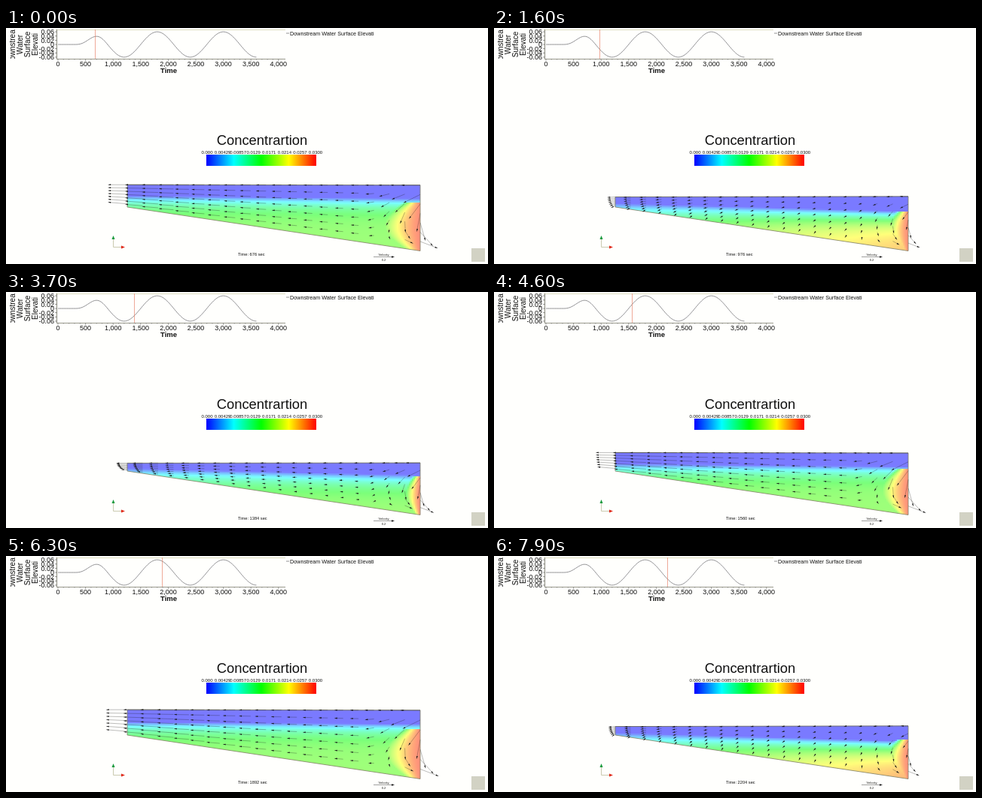
Recreate the animation shown at these times as an HTML page with a canvas. Size 640x315 px, loop 8 s.

```html
<!DOCTYPE html>
<html lang="en">
<head>
<meta charset="utf-8">
<title>Concentration in an estuary</title>
<style>
html, body { margin: 0; width: 100%; height: 100%; overflow: hidden; background: #fffffd; }
canvas { display: block; }
</style>
</head>
<body>
<canvas id="stage" width="640" height="315"></canvas>
<script>
const g = document.getElementById('stage').getContext('2d');
const LEFT = 161, RIGHT = 550, DEG = Math.PI / 180;
const STEP_MS = 100, STEPS = 80;
// [step, simulated seconds]
const CLOCK = [[0, 676], [9, 836], [24, 1132], [37, 1384], [55, 1736], [70, 2028], [79, 2204]];

const lerp = (a, b, k) => a + (b - a) * k;
const clamp = (v, a = 0, b = 1) => Math.min(b, Math.max(a, v));
const bed = x => lerp(239, 297.5, (x - LEFT) / (RIGHT - LEFT));
const phase = t => (t - 300) / 1200 * 2 * Math.PI;
const chartX = t => 69 + t * 0.0732;
const chartY = v => 22 - v * 282;

function ramp(t) {
  const w = clamp((t - 300) / 600);
  return w * w * (3 - 2 * w);
}
const level = t => 0.06 * ramp(t) * Math.sin(phase(t));

function simTime(step) {
  const i = CLOCK.findIndex(k => k[0] >= step);
  if (i < 1) return CLOCK[0][1];
  const [a, ta] = CLOCK[i - 1], [b, tb] = CLOCK[i];
  return Math.round(lerp(ta, tb, (step - a) / (b - a)) / 4) * 4;
}

function text(s, x, y, size, align = 'left', weight = '') {
  g.font = `${weight} ${size}px "Liberation Sans", Arial, sans-serif`;
  g.textAlign = align;
  g.fillStyle = '#111';
  g.fillText(s, x, y);
}

function line(points, color, width = 1) {
  g.beginPath();
  points.forEach(p => g.lineTo(...p));
  g.strokeStyle = color;
  g.lineWidth = width;
  g.stroke();
}

function head(x, y, angle, length, half, color) {
  const c = Math.cos(angle), s = Math.sin(angle);
  g.beginPath();
  g.moveTo(x, y);
  g.lineTo(x - length * c - half * s, y - length * s + half * c);
  g.lineTo(x - length * c + half * s, y - length * s - half * c);
  g.fillStyle = color;
  g.fill();
}

function arrow(x, y, dx, dy) {
  line([[x, y], [x + dx, y + dy]], 'rgba(30,30,30,.6)', 0.5);
  head(x + dx, y + dy, Math.atan2(dy, dx), 3.6, 0.9, '#151515');
}

function drawChart(t) {
  line([[66, 2.5], [371, 2.5]], '#dcdcc0');
  line([[67.5, 2], [67.5, 41]], '#8a8a7c');
  line([[67, 41.5], [371, 41.5]], '#9a9a8c');
  for (let v = -6; v <= 6; v += 2) {
    const y = chartY(v / 100);
    line([[65, y], [68, y]], '#666', 0.7);
    text(v ? (v / 100).toFixed(2) : '0', 64, y + 3.2, 9, 'right');
  }
  for (let s = 0; s <= 4000; s += 100) {
    const x = chartX(s), major = s % 500 === 0;
    line([[x, 41], [x, major ? 44 : 42.5]], '#777', 0.7);
    if (major) text(s.toLocaleString('en-US'), x, 51, 9, 'center');
  }
  text('Time', 216, 60, 9.5, 'center', 'bold');

  g.save();
  g.beginPath();
  g.rect(0, 2, 46, 39);
  g.clip();
  ['Downstream', 'Water', 'Surface', 'Elevati'].forEach((word, i) => {
    g.save();
    g.translate([12, 21.5, 32, 42][i], 22);
    g.rotate(-Math.PI / 2);
    text(word, 0, 0, 10, 'center');
    g.restore();
  });
  g.restore();

  const curve = [];
  for (let s = 0; s <= 3600; s += 20) curve.push([chartX(s), chartY(level(s))]);
  line(curve, '#77777a', 0.8);
  const x = Math.round(chartX(t)) + 0.5;
  line([[x, 2], [x, 41]], 'rgba(230,125,100,.65)');
  line([[372, 7], [376, 7]], '#77777a', 0.8);
  text('Downstream Water Surface Elevati', 377, 9.5, 7.2);
}

function drawScale() {
  text('Concentrartion', 340, 156, 18.4, 'center');
  const hues = g.createLinearGradient(266, 0, 412, 0);
  for (let i = 0; i <= 12; i++) hues.addColorStop(i / 12, `hsl(${240 - 20 * i},100%,50%)`);
  g.fillStyle = hues;
  g.fillRect(266, 169, 146, 15);
  ['0.000', '0.00429', '0.00857', '0.0129', '0.0171', '0.0214', '0.0257', '0.0300']
    .forEach((s, i) => text(s, 267 + i * 20.57, 168, 6, 'center'));
}

// Tidal state that both the concentration and the velocity depend on.
function tide(t) {
  const a = phase(t);
  return {
    surf: 219.3 - 266 * level(t),
    flow: ramp(t) * Math.cos(a - 74 * DEG),
    swell: Math.max(0, Math.cos(a - 80 * DEG)),
    ebb: Math.max(0, Math.cos(a - 240 * DEG)) ** 1.5,
    sin: Math.sin(a)
  };
}

function concentration(x, y, { surf, flow, swell, ebb }) {
  const k = (x - LEFT) / (RIGHT - LEFT);
  const top = surf + lerp(13 + 9 * flow, 20 + 3 * flow, k) + 6 * ebb;
  const most = lerp(0.57, 0.55 + 0.45 * k, ebb);
  let c = most * (1 - Math.exp(-Math.max(0, y - top + 3) / (12 - 2 * flow + 2 * ebb)));
  // salt wedge entering at the right edge
  const wedgeTop = 240 + (surf - 219) * 0.65;
  if (y > wedgeTop) {
    const q = clamp((y - wedgeTop) / (297 - wedgeTop));
    const width = (16 + 34 * swell + 10 * ebb) * (0.35 + 0.65 * Math.sin(Math.PI * q));
    c = Math.max(c, 0.96 - 0.38 * ((RIGHT - x) / width) ** 1.5);
  }
  return c;
}

function drawField(s) {
  const { surf } = s;
  const endY = surf + s.flow;
  g.save();
  g.beginPath();
  g.moveTo(LEFT, surf);
  g.lineTo(RIGHT, endY);
  g.lineTo(RIGHT, bed(RIGHT));
  g.lineTo(LEFT, bed(LEFT));
  g.clip();
  for (let x = LEFT; x < RIGHT; x += 2) {
    for (let y = Math.floor(surf) - 2; y < bed(x) + 2; y += 2) {
      const c = concentration(x + 1, y + 1, s);
      g.fillStyle = `hsl(${240 * (1 - c)},100%,74%)`;
      g.fillRect(x, y, 2, 2);
    }
  }
  g.restore();
  line([[LEFT, surf], [RIGHT, endY]], '#66665c', 0.9);
  line([[LEFT, surf], [LEFT, bed(LEFT)], [RIGHT, bed(RIGHT)], [RIGHT, endY]], '#7d7d60', 0.8);
}

function drawArrows(s) {
  const speed = 18.5 + 13 * s.flow;
  const shear = clamp(0.35 - 0.25 * s.flow - 0.3 * s.sin, 0, 0.9);
  for (let i = 0; i < 20; i++) {
    const x = lerp(LEFT, RIGHT, i / 19), depth = bed(x) - 209;
    const w = clamp((x - 470) / 80) ** 1.6;
    // the bed row itself does not move
    for (let j = 0; j < 7; j++) {
      const r = j / 7;
      const y = lerp(s.surf + s.flow * i / 19, bed(x), r);
      const u = -speed * 30 / depth * (1 - shear * r * r);
      const v = u * 0.1 * r + 4.5 * s.ebb * (r + 0.2);
      const turn = Math.PI * (1 - 1.03 * r);
      const pull = (12 + 0.5 * speed) * (1 - 0.5 * s.ebb * (1 - r));
      arrow(x, y, lerp(u, pull * Math.cos(turn), w), lerp(v, pull * Math.sin(turn), w));
    }
  }
}

function drawFurniture(t) {
  text(`Time: ${t} sec`, 308, 303.5, 5.7);
  text('Velocity', 501.5, 303.5, 4, 'center');
  line([[488, 305.5], [514, 305.5]], '#777', 0.7);
  head(516, 305.5, 0, 4, 1.2, '#111');
  text('0.2', 501.5, 311, 4, 'center');

  line([[142.5, 282], [142.5, 292.5], [154, 292.5]], '#c4c4a8', 0.9);
  head(142.5, 277, -Math.PI / 2, 5, 2, '#159a3c');
  head(158, 292.5, 0, 5, 2, '#e02818');

  g.fillStyle = '#d2d2c4';
  g.fillRect(618, 294, 18, 18);
}

function draw(step) {
  const t = simTime(step), state = tide(t);
  g.fillStyle = '#fffffd';
  g.fillRect(0, 0, 640, 315);
  drawChart(t);
  drawScale();
  drawField(state);
  drawArrows(state);
  drawFurniture(t);
}

let shown = -1;
const start = performance.now();
function tick() {
  const step = Math.floor((performance.now() - start) / STEP_MS) % STEPS;
  if (step !== shown) draw(shown = step);
  requestAnimationFrame(tick);
}
tick();
</script>
</body>
</html>
```
